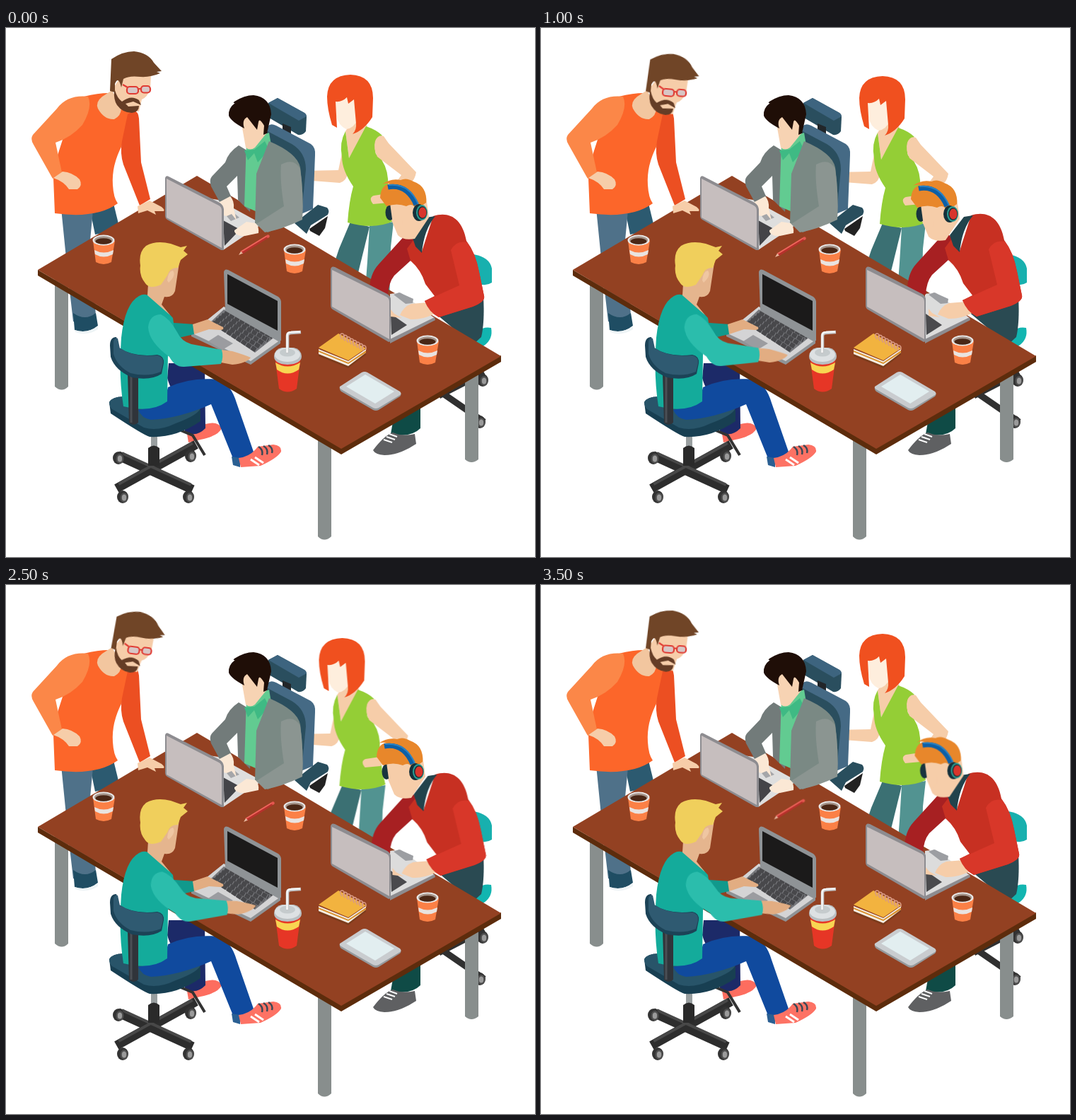
These frames come from a looping animation (748x748 px, 4000 ms). An HTML page:

```html
<!DOCTYPE html>
<html lang="en">
<head>
<meta charset="utf-8">
<title>Team at a table</title>
<style>
html,body{margin:0;width:100%;height:100%;overflow:hidden;background:#fff}
svg{display:block;width:100vw;height:100vh}
</style>
</head>
<body>
<svg viewBox="0 0 748 748">
<defs>
  <g id="cup">
    <path d="M-15 1L-11 31Q0 37 11 31L16 1Z" fill="#fb8046"/>
    <path d="M-13 14Q0 21 14 14L13 20Q0 27-12 20Z" fill="#e9e3e0"/>
    <ellipse rx="15.5" ry="7.5" fill="#e9e9e9"/>
    <ellipse rx="13" ry="5.8" fill="#a5948a"/>
    <ellipse cy="1.5" rx="11.5" ry="4.3" fill="#4a2716"/>
  </g>
  <g id="wheel">
    <ellipse rx="8" ry="9" fill="#333"/>
    <ellipse cx="2" cy="1" rx="5.5" ry="7" fill="#4e4e4e"/>
    <ellipse cx="2" cy="1" rx="3.2" ry="4.5" fill="#9a9a9a"/>
  </g>
</defs>

<!-- standing woman -->
<g id="woman">
  <path d="M487 274L514 281L497 350L460 345L471 312Z" fill="#3b7073"/>
  <path d="M514 280L548 274L544 310L542 390L508 370L511 330Z" fill="#529391"/>
  <path d="M476 172L470 201L420 202L420 215L472 219Q482 216 484 203Z" fill="#f6cda9"/>
  <path d="M480 146L485 184L511 139L498 118Z" fill="#f6cda9"/>
  <path d="M480 146L485 184L509 139Q524 144 532 152Q519 164 523 178L531 186Q542 203 540 225Q542 250 548 273Q520 286 483 275Q485 245 491 224Q475 201 475 182Q471 162 480 146Z" fill="#94ce36"/>
  <path d="M522 160Q526 150 534 153L541 163L580 204Q578 214 574 217L560 226L541 247L519 249Q512 240 520 237L540 234L559 208L525 182Q519 170 522 160Z" fill="#f6cda9"/>
  <path d="M465 100L497 98L498 128Q492 142 481 143Q470 138 467 124Z" fill="#feeedd"/>
  <path d="M461 137Q454 114 454 97Q455 67 487 66Q519 67 519 99L518 126Q506 145 490 150Q496 144 495 135L492 101L484 107L482 98Q475 105 466 104L468 141Z" fill="#f0501f"/>
</g>

<!-- tall chair -->
<path d="M371 106L384 99L422 120Q425 122 425 126L424 146Q420 152 413 151L372 127Z" fill="#2a4e5e"/>
<path d="M371 106L384 99L422 120Q425 122 425 125L414 131Z" fill="#3d647f"/>
<path d="M391 135L403 140V160L391 156Z" fill="#222629"/>
<path d="M370 139Q374 134 382 138L431 164Q438 169 437 180L434 256L410 266L368 170Z" fill="#456a85"/>
<path d="M368 145L404 164Q424 176 424 200L418 262L390 240Z" fill="#2a4e5e"/>
<path d="M408 276L441 250L454 254Q458 258 455 264L431 279L425 291Z" fill="#294e5d"/>
<path d="M429 284L455 266L451 283L443 294L430 287Z" fill="#222"/>

<!-- bearded man, lower part -->
<path d="M119 258L152 248L161 285L126 292Z" fill="#2c5a70"/>
<path d="M78 255L123 258L119 300L128 420L95 415L87 345Z" fill="#4f7189"/>
<path d="M95 403Q112 415 127 403L130 421Q115 433 97 427Z" fill="#1f4d63"/>
<path d="M97 427Q115 433 130 421L130 426Q115 436 98 430Z" fill="#eef4f6"/>

<!-- seat behind the hoodie -->
<path d="M661 320Q684 324 687 340V360Q676 367 664 359Z" fill="#18b0ae"/>
<path d="M650 446Q668 420 686 424Q689 440 676 449L660 455Z" fill="#12b5b0"/>
<path d="M603 400L675 380Q677 416 672 437L660 448Z" fill="#2a4a52"/>
<path d="M612 520L676 487M618 517L676 557" stroke="#303030" stroke-width="9" fill="none"/>
<use href="#wheel" x="674" y="498"/><use href="#wheel" x="670" y="557"/>
<path d="M550 540L586 535L586 566Q572 580 544 574Z" fill="#0f4b46"/>
<path d="M519 597Q535 576 547 572Q560 578 578 574L580 588Q556 604 535 604Q522 603 519 597Z" fill="#5f6062"/>
<path d="M534 582l12 4M538 578l12 4M542 574l11 4" stroke="#fff" stroke-width="2"/>

<!-- blond man, legs and seat -->
<path d="M256 574Q272 570 282 560Q300 555 305 566Q300 577 275 582L258 586Z" fill="#fd6d5f"/>
<path d="M230 474H281L282 566Q268 580 253 570L248 520Q235 520 228 495Z" fill="#1c2a68"/>
<path d="M240 566L264 576L281 604" stroke="#333" stroke-width="4" fill="none"/>
<path d="M205 570H214V597H205Z" fill="#999fa0"/>
<g stroke-linecap="square" fill="none">
  <path d="M162 648L263 592M164 607L258 650" stroke="#2d2d2d" stroke-width="13"/>
  <path d="M161 644L262 588M166 602L260 645" stroke="#484848" stroke-width="4"/>
</g>
<path d="M201 594Q209 587 217 594V619H201Z" fill="#2a2a2a"/>
<use href="#wheel" x="159" y="608"/><use href="#wheel" x="261" y="605"/>
<use href="#wheel" x="165" y="663"/><use href="#wheel" x="258" y="663"/>
<path d="M146 529Q152 519 175 522L240 540L275 540V556Q240 580 203 578Q195 576 148 545Z" fill="#183f52"/>
<path d="M146 529Q152 519 175 522L275 536Q275 546 240 559Q215 571 195 565L150 539Q146 535 146 529Z" fill="#285469"/>
<path d="M187 540Q225 533 229 508Q262 493 300 497Q318 503 326 530L351 602Q338 612 322 611L290 532Q245 552 205 554Q192 552 187 540Z" fill="#104a9e"/>
<path d="M319 606L331 608V621L321 618Z" fill="#2a5f92"/>
<path d="M329 608Q346 606 356 592L378 589Q390 590 389 599Q384 608 360 619L332 621Z" fill="#fd7264"/>
<path d="M346 610l12 8M352 607l12 8" stroke="#fff" stroke-width="3"/>
<path d="M357 592q7 4 5 12M364 591q7 4 5 12M371 590q7 4 5 11" stroke="#3b4a57" stroke-width="2.5" fill="none"/>

<!-- table -->
<g fill="#888e8d">
  <path d="M69 352H88V507Q79 516 69 507Z"/>
  <path d="M441 575H460V719Q450 728 441 719Z"/>
  <path d="M649 490H668V610Q658 618 649 610Z"/>
</g>
<path d="M45 342L474 594L700 463V472L474 603L45 350Z" fill="#5d2c0c"/>
<path d="M45 342L270 209L700 464L474 595Z" fill="#934122"/>

<!-- bearded man, upper part -->
<path d="M110 97Q130 92 145 92L180 116Q189 120 186 128L164 166Q149 195 151 222Q152 240 158 248Q128 270 69 262L67 212L71 186L80 158Z" fill="#fc662a"/>
<path d="M180 117Q187 117 188 128L191 190L204 242L189 251L166 193Q161 178 164 160L172 122Z" fill="#ec4f22"/>
<path d="M116 97Q87 94 72 114L38 151Q34 157 39 165L66 213L79 204L70 162Q92 155 108 137Q123 112 116 97Z" fill="#fb8748"/>
<path d="M67 212L80 203Q94 204 104 214Q109 223 101 228L89 228Q82 217 67 212Z" fill="#f6cda9"/>
<path d="M186 252L203 244L220 253Q225 257 223 259L210 259L212 264L200 258L187 262Z" fill="#f6cda9"/>
<path d="M150 88L136 97Q126 105 130 114Q139 130 153 129Q163 124 163 113Z" fill="#f2c69f"/>
<g id="beard">
  <path d="M153 83L164 66L205 66L204 86Q200 98 192 101L188 118L172 116L154 97Z" fill="#f6cda9"/>
  <path d="M154 88Q157 99 164 104Q177 94 188 102L191 109L180 104L169 107L173 111L188 110Q188 119 178 120Q165 120 157 109Q152 102 153 88Z" fill="#653d26"/>
  <path d="M147 89L149 44Q165 33 181 33Q201 35 209 49L220 61L213 62L218 64Q204 70 190 69Q174 67 166 72L163 84Q159 67 154 79L154 91Z" fill="#704527"/>
  <g fill="#d8c6c5" stroke="#e03c34" stroke-width="2.2">
    <path d="M165 80L172 84M187 86h4" fill="none"/>
    <rect x="171" y="83" width="16" height="10" rx="4"/>
    <rect x="191" y="82" width="13" height="9.5" rx="4"/>
  </g>
</g>

<!-- man in the grey jacket -->
<path d="M281 240L300 243L362 277L307 314L295 300Z" fill="#dedede"/>
<path d="M307 272L331 285L309 308Z" fill="#444448"/>
<path d="M306 259L318 258L330 268L318 273Z" fill="#a5a6a9"/>
<path d="M329 166Q314 176 310 190L291 210Q287 215 290 224L302 246L319 240L312 224L327 209L328 243L345 260L352 180Z" fill="#727b7a"/>
<path d="M340 160L372 148L376 172L355 260L337 252Z" fill="#62cb91"/>
<path d="M337 173L351 172L366 160L372 172L356 190L351 177L342 187Z" fill="#3fba84"/>
<path d="M372 160Q412 177 416 197Q421 235 419 270L370 289L352 276L354 206Z" fill="#7a8984"/>
<path d="M389 193Q407 183 416 199Q421 235 419 271Q390 285 366 289L354 277L393 252Q387 215 389 193Z" fill="#8b9591"/>
<path d="M300 247L317 238Q323 244 322 255L326 272L319 263L312 266Q300 264 300 255Z" fill="#fbe8d5"/>
<path d="M323 286L340 274L353 276Q358 281 357 290L338 294Q326 295 323 288Z" fill="#fbe8d5"/>
<path d="M326 125L368 126L369 148L352 169Q345 174 339 169L334 141Z" fill="#f7d3b3"/>
<path d="M315 124Q314 113 324 106Q320 107 323 104Q337 95 350 95Q374 98 375 122L369 149L364 151L365 138Q358 126 357 133L355 144L341 126Q333 130 337 142Q318 132 315 124Z" fill="#1f0e07"/>
<path d="M225 212Q226 208 230 210L302 247Q307 250 308 256V314L304 314L228 271Q225 269 225 266Z" fill="#8d8c90"/>
<path d="M227 213L301 251Q305 253 305 258V311L227 268Z" fill="#c6bebe"/>

<!-- desk things -->
<g id="pencil">
  <path d="M333 318L370 295" stroke="#b6312c" stroke-width="4.4"/>
  <path d="M332 316.5L369 294" stroke="#f0655c" stroke-width="2"/>
  <path d="M329 321L332 316L335 318.5Z" fill="#e9b9a0"/>
  <circle cx="370.5" cy="294.5" r="2.2" fill="#e4574f"/>
</g>
<use href="#cup" x="138" y="300"/><use href="#cup" x="408" y="313"/><use href="#cup" x="596" y="442"/>

<path d="M442 458L484 475L509 458V462L484 481L442 464Z" fill="#7c3c1c"/>
<path d="M442 454L484 471L509 454V459L484 478L442 461Z" fill="#f4eee3"/>
<path d="M442 456L484 473L509 456V459L484 475L442 458Z" fill="#d98e2a"/>
<path d="M442 452L470 432L509 453L484 470Z" fill="#f2b33f"/>
<g id="rings" fill="none" stroke="#d99a83" stroke-width="1.6"></g>

<path d="M472 508L503 488Q507 486 511 488L557 515Q560 518 557 521L527 540Q523 542 519 540L474 514Q471 511 472 508Z" fill="#95999c"/>
<path d="M472 507L503 487Q507 485 511 487L557 514Q560 517 557 519L527 537Q523 539 519 537L474 511Q471 509 472 507Z" fill="#c9cccf"/>
<path d="M481 507L508 490L549 514L522 531Z" fill="#e2eef0"/>

<path d="M380 464L386 510Q398 519 411 510L417 464Z" fill="#e63626"/>
<path d="M381 473Q398 484 416 473L414 483Q398 494 383 483Z" fill="#f8d552"/>
<path d="M379 464Q380 454 390 452H407Q417 454 418 464Q418 475 398 476Q379 475 379 464Z" fill="#b9bfc2"/>
<ellipse cx="398" cy="462" rx="18" ry="10" fill="#dde1e3"/>
<ellipse cx="398" cy="459" rx="11" ry="5.5" fill="#c5cbcd"/>
<path d="M398 460V435Q398 431 403 431L417 430" fill="none" stroke="#c4c6c8" stroke-width="4.5"/>
<path d="M397.5 459V435Q398 430 403 430L416 429.5" fill="none" stroke="#f6f6f6" stroke-width="2.6"/>

<!-- man with headphones -->
<path d="M543 376L558 374L606 410L543 445Z" fill="#dcdcdc"/>
<path d="M548 377L556 374L576 383L575 389L565 390Z" fill="#9c9ea2"/>
<path d="M544 404L567 420L545 434Z" fill="#4a4a4d"/>
<g id="hoodie">
  <path d="M567 290L582 300L586 336L572 329L549 350Q541 360 540 378L514 372Q514 348 527 334Z" fill="#a72022"/>
  <path d="M544 398L549 404L560 410L544 408Z" fill="#f6cda9"/>
  <path d="M557 406Q562 394 573 390L597 388L606 404Q588 413 572 412Z" fill="#f6cda9"/>
  <path d="M576 300L588 316L604 266C626 259 645 268 651 301Q664 318 669 345L676 379Q678 387 660 394L612 409Q600 402 592 386L606 379L593 362Q587 342 572 329L567 312Z" fill="#c73022"/>
  <path d="M629 314Q636 300 652 303Q664 318 669 345L676 379Q678 387 660 394L612 409Q598 402 592 386L641 364Z" fill="#d83729"/>
  <path d="M574 294L594 268L607 266Q591 285 588 318L579 309Z" fill="#22434c"/>
</g>
<g id="phones">
  <path d="M539 247L560 236L594 238L598 268L578 298Q562 301 554 293L541 262Z" fill="#f6cda9"/>
  <ellipse cx="543" cy="261" rx="6.5" ry="11" fill="#19343e"/>
  <path d="M543 248L556 245L561 277L554 286L546 270Z" fill="#f6cda9"/>
  <path d="M529 240Q530 222 543 220Q536 219 532 221Q544 212 558 215Q566 211 576 217Q596 224 594 247L580 257Q576 246 566 252Q553 247 538 252Z" fill="#e8872b"/>
  <path d="M540 225Q567 220 580 250" fill="none" stroke="#0d5fa6" stroke-width="7"/>
  <path d="M541 222Q570 219 583 249" fill="none" stroke="#2a82c4" stroke-width="2"/>
  <ellipse cx="584" cy="261" rx="9" ry="12" fill="#15303a"/>
  <ellipse cx="588" cy="261" rx="8" ry="11" fill="#2b9c93"/>
  <ellipse cx="588.5" cy="261" rx="6.5" ry="9" fill="#1c2f36"/>
  <ellipse cx="589" cy="261" rx="5.5" ry="7.5" fill="#d8362c"/>
</g>
<path d="M459 341Q460 336 465 338L539 376Q544 379 544 384V443L541 444L462 398Q459 396 459 392Z" fill="#8d8c90"/>
<path d="M461 342L538 380Q542 382 542 387V440L461 394Z" fill="#c6bebe"/>
<path d="M543 440L606 409L607 413L543 446Z" fill="#8d8c90"/>

<!-- open laptop -->
<path d="M262 431L308 394L388 441V446L346 476L262 436Z" fill="#8f9396"/>
<path d="M262 431L308 394L388 441L346 471Z" fill="#d4d4d5"/>
<path d="M308 398L381 436L352 459L289 416Z" fill="#77787c"/>
<g id="keys" fill="none" stroke="#48484b" stroke-width="6.2" stroke-dasharray="7 1.2"></g>
<path d="M286 443L300 434L321 446L306 455Z" fill="#9b9ca0"/>
<path d="M308 345Q309 340 314 342L385 380Q389 383 389 388V442L385 443L310 400Z" fill="#8f9396"/>
<path d="M313 348L384 386V428L313 390Z" fill="#1b1a1a"/>

<!-- blond man, upper part -->
<path d="M225 416L267 419L266 433L240 439Z" fill="#11998c"/>
<path d="M264 419L285 412L307 423Q309 427 302 427L287 426L266 433Z" fill="#e2ad82"/>
<path d="M188 379Q200 372 216 388L236 410Q240 430 229 460L228 528Q205 545 166 535Q159 490 163 438Q168 390 188 379Z" fill="#14ab9b"/>
<path d="M201 362L217 357L230 342L245 332L239 372Q235 382 224 380L220 391L232 406L200 378Z" fill="#e5b58e"/>
<path d="M190 336Q187 317 198 308Q212 300 233 305L247 310L256 308L251 315L257 320L247 328L243 339Q232 338 228 350L219 363Q203 370 197 361Q188 350 190 336Z" fill="#f0cf5c"/>
<path d="M228 357Q229 344 236 343Q241 350 230 360Z" fill="#efc6a2"/>
<g id="arm">
  <path d="M304 455L320 457Q337 462 346 466Q340 474 320 476L304 473Z" fill="#e2ad82"/>
  <path d="M201 423Q203 405 219 405Q231 410 242 430Q248 443 262 447L305 455Q308 465 304 475L252 479Q239 480 231 465Q202 444 201 423Z" fill="#2bbdac"/>
</g>
<path d="M172 488H187V558Q180 564 174 558Z" fill="#30343a"/>
<path d="M177 490V558" stroke="#4a4e54" stroke-width="3"/>
<path d="M147 449Q147 437 156 437L160 452Q180 466 214 462Q224 464 223 474L220 489Q205 499 178 494Q154 484 148 465Z" fill="#1c4357"/>
<path d="M152 443Q154 437 158 439L161 453Q182 466 214 463Q223 465 222 474L219 486Q200 494 176 488Q157 478 152 461Z" fill="#2f5a71"/>
</svg>
<script>
const $ = id => document.getElementById(id);

function addPaths(id, count, d) {
  for (let i = 0; i < count; i++) {
    const p = document.createElementNS('http://www.w3.org/2000/svg', 'path');
    p.setAttribute('d', d(i));
    $(id).append(p);
  }
}
addPaths('keys', 5, i => `M${309 - i * 4.2} ${402 + i * 3.5}L${377 - i * 6} ${437 + i * 4.6}`);
addPaths('rings', 8, i => `M${475 + i * 4.4} ${440 + i * 2.4}q-5 -7 0 -8q4 0 3 6`);

// Eight held poses per loop: [dx, dy, degrees]
const poses = {
  beard: [[0, 0, 0], [0, 0, 0], [1, 0.5, 5.5], [1.5, 1, 8.5], [1.5, 1, 8.5], [1.5, 0.5, 7.5], [1.5, 0.5, 7.5], [1, 0.5, 4.5]],
  woman: [[0, 0], [0, 0], [-4, 2], [-9, 4], [-11.5, 9], [-11.5, 9], [-9, 7], [-4, 3]],
  hoodie: [[0, 0], [4, -1], [4, -1], [7, -1], [2.5, 1], [2.5, 2], [0, 1], [0, 1]],
  phones: [[0, 0], [-6, 2], [-6, 2], [-9, 3], [-12, 6], [-5, 3], [-0.5, 1.5], [-0.5, 1.5]],
  pencil: [[0, 0], [1, 1], [2, 3], [3, 7], [6, 11], [7, 14], [4, 12], [0.5, 10.5]],
  arm: [[0, 0, 0], [1.5, 0, -1.6], [1.5, 0, -1.6], [3, 1, -4.5], [3, 1, -5.8], [3, 1, -5.8], [3, 1, -5.8], [3, 1, -5.8]]
};
const pivots = { beard: '150px 90px', arm: '212px 415px' };

for (const [id, steps] of Object.entries(poses)) {
  $(id).style.transformOrigin = pivots[id] || '0 0';
  const frames = [...steps, steps[0]].map(([x, y, r = 0], i) => ({
    transform: `translate(${x}px,${y}px) rotate(${r}deg)`,
    offset: i / 8,
    easing: 'step-end'
  }));
  $(id).animate(frames, { duration: 4000, iterations: Infinity });
}
</script>
</body>
</html>
```
